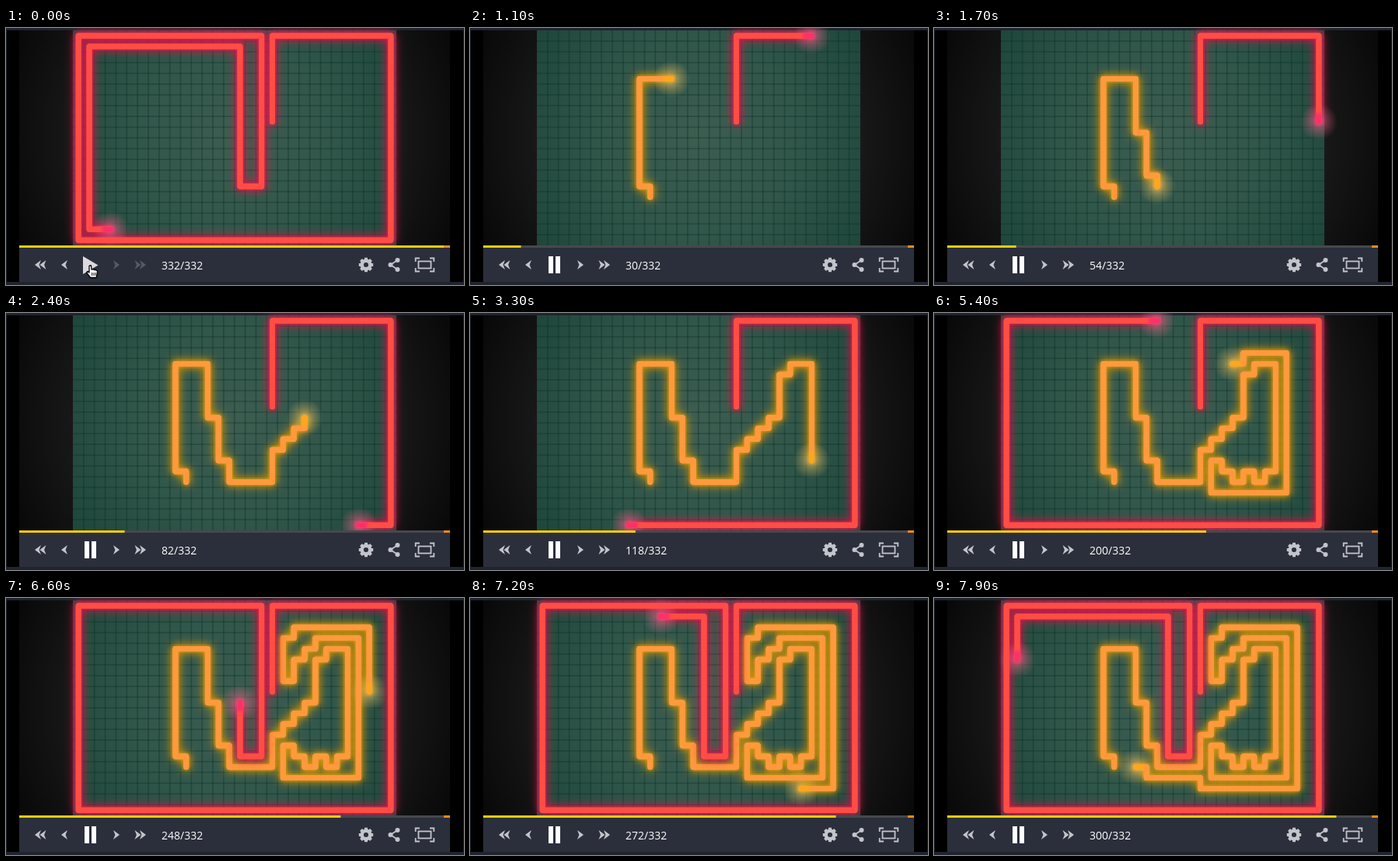
Animation of 589 by 331 pixels, one loop 8000 ms. Source, as an HTML page with a canvas:

```html
<!DOCTYPE html>
<html lang="en">
<head>
<meta charset="utf-8">
<title>Light trails replay</title>
<style>
  html, body { margin: 0; width: 100%; height: 100%; overflow: hidden; background: #000; }
  canvas { display: block; }
</style>
</head>
<body>
<canvas id="stage" width="589" height="331"></canvas>
<script>
const ctx = document.getElementById('stage').getContext('2d');
const LOOP = 8000, TOTAL = 332;
const CELL = 13.85, BOARD = { x: 86, y: 3, w: 416, h: 277 };
const ICON = '#c3c5cb', DIM = '#565a65';

const players = [
  {
    start: [10, 15], line: '#ff993d', glow: '#efa000', tip: '#ffa61c', halo: '255,205,110', lost: true,
    moves: 'U1 L1 U10 R3 D5 R1 D4 R1 D2 R4 U3 R1 U1 R1 U1 R1 U1 R1 U4 R1 U1 R2 D10 ' +
      'L1 D1 L1 U1 L1 D1 L1 U1 L1 U1 L1 D3 R7 U13 L4 D1 L1 D1 L1 D2 L1 U4 R1 U1 R7 D15 L9 U1 L5 U1 L1'
  },
  {
    start: [18, 8], line: '#ff4d45', glow: '#f5104c', tip: '#ff2f68', halo: '255,110,150', lost: false,
    moves: 'U8 R11 D19 L29 U19 R17 D14 L2 U13 L14 D17 R2'
  }
];
const DIRS = { U: [0, -1], D: [0, 1], L: [-1, 0], R: [1, 0] };

for (const p of players) {
  let [col, row] = p.start;
  p.cells = [[col, row]];
  for (const move of p.moves.split(' ')) {
    const [dx, dy] = DIRS[move[0]];
    for (let i = 0; i < +move.slice(1); i++) p.cells.push([col += dx, row += dy]);
  }
  p.points = p.cells.map(([c, r]) => [93.2 + c * CELL, 10 + r * CELL]);
}

function rect(color, x, y, w, h) {
  ctx.fillStyle = color;
  ctx.fillRect(x, y, w, h);
}

function radial(x, y, r, ...stops) {
  const g = ctx.createRadialGradient(x, y, 0, x, y, r);
  stops.forEach(([at, color]) => g.addColorStop(at, color));
  return g;
}

function trace(points) {
  ctx.beginPath();
  points.forEach(([x, y]) => ctx.lineTo(x, y));
}

function polygon(color, points) {
  trace(points);
  ctx.closePath();
  ctx.fillStyle = color;
  ctx.fill();
}

function stroke(color, width, points) {
  trace(points);
  ctx.strokeStyle = color;
  ctx.lineWidth = width;
  ctx.stroke();
}

function drawBackdrop() {
  rect('#20242e', 0, 0, 589, 331);
  rect('#000', 1, 3, 587, 324);
  rect(radial(294, 141, 310, [0, '#242424'], [0.65, '#191919'], [1, '#080808']), 17, 3, 554, 277);
  const { x, y, w, h } = BOARD;
  rect(radial(294, 141, 250, [0, '#3d5d51'], [0.5, '#31564a'], [1, '#1f463b']), x, y, w, h);
  for (let i = 1; i < 30; i++) rect('rgba(8,48,38,.38)', x + i * CELL - 0.8, y, 1.6, h);
  for (let i = 1; i < 20; i++) rect('rgba(8,48,38,.38)', x, y + i * CELL - 0.8, w, 1.6);
}

function drawTrail(p, steps) {
  const points = p.points.slice(0, steps + 1);
  const [hx, hy] = points[points.length - 1];
  ctx.lineCap = ctx.lineJoin = 'round';
  ctx.shadowColor = p.glow;
  for (const blur of [14, 7]) {
    ctx.shadowBlur = blur;
    stroke(p.line, 7, points);
  }
  ctx.shadowBlur = 0;
  const halo = radial(hx, hy, 24, [0, `rgba(${p.halo},.6)`], [0.4, `rgba(${p.halo},.32)`], [1, `rgba(${p.halo},0)`]);
  rect(halo, hx - 24, hy - 24, 48, 48);
  stroke(p.line, 7, points);
  const [px, py] = points[Math.max(0, points.length - 2)];
  const fade = ctx.createLinearGradient(px, py, hx, hy);
  fade.addColorStop(0, p.line);
  fade.addColorStop(0.4, p.tip);
  stroke(points.length > 1 ? fade : p.tip, 7, points.slice(-2));
}

function chevron(color, x, dir) {
  polygon(color, [[0, 0], [8, -6], [5.6, 0], [8, 6]].map(([dx, dy]) => [x + dx * dir, 305 + dy]));
}

function drawGear() {
  ctx.save();
  ctx.translate(463, 305);
  ctx.strokeStyle = ICON;
  ctx.lineWidth = 4.5;
  ctx.beginPath();
  ctx.arc(0, 0, 5.3, 0, 7);
  ctx.stroke();
  for (let i = 0; i < 8; i++) {
    rect(ICON, -2, -9.2, 4, 4);
    ctx.rotate(Math.PI / 4);
  }
  ctx.restore();
}

function drawShare() {
  stroke(ICON, 1.8, [[503.5, 299], [494.5, 305], [503.5, 311]]);
  for (const [x, y] of [[503.5, 299], [494.5, 305], [503.5, 311]]) {
    ctx.beginPath();
    ctx.arc(x, y, 3, 0, 7);
    ctx.fillStyle = ICON;
    ctx.fill();
  }
}

function drawFullscreen() {
  ctx.lineCap = 'butt';
  ctx.lineJoin = 'miter';
  for (const sx of [-1, 1]) for (const sy of [-1, 1]) {
    stroke(ICON, 1.8, [[6.5, 8.5], [11.8, 8.5], [11.8, 4]].map(([x, y]) => [538.5 + x * sx, 305 + y * sy]));
  }
  ctx.strokeRect(530.5, 300.5, 16, 9);
}

function drawHand() {
  ctx.lineJoin = 'round';
  const hand = [[107, 306], [109.5, 306], [110, 311], [112, 310.5], [113.5, 311.5], [115.5, 311.5],
    [117.5, 313], [117.5, 317], [116, 321.5], [108.5, 321.5], [104, 315.5], [104.5, 313.5], [107, 315]];
  polygon('#fff', hand);
  stroke('#000', 1.3, [...hand, hand[0]]);
  for (const x of [110.2, 112.7, 115.2]) rect('#000', x, 315, 1, 4);
}

function drawControls(n, playing) {
  rect('#2b2f3b', 17, 283, 554, 44);
  rect('#47484c', 17, 280, 554, 3);
  rect('#f3cb0c', 17, 280, 554 * (n - 1) / (TOTAL - 1), 3);
  rect('#ef8a1c', 563, 280, 8, 3);

  const forward = playing ? ICON : DIM;
  for (const x of [37, 43.5, 71]) chevron(ICON, x, 1);
  for (const x of [146, 173.5, 180]) chevron(forward, x, -1);
  if (playing) {
    rect('#fff', 101, 294, 6, 22);
    rect('#fff', 110, 294, 6, 22);
  } else {
    polygon('#dcd9de', [[99, 294], [118.5, 305.5], [99, 317]]);
  }
  ctx.font = '14px "Open Sans", sans-serif';
  ctx.fillStyle = '#fff';
  ctx.fillText(`${n}/${TOTAL}`, 200, 311);
  drawGear();
  drawShare();
  drawFullscreen();
  if (!playing) drawHand();
}

// The replay advances four turns per tick, with one short tick midway.
function turnAt(t) {
  if (t < 400) return TOTAL;
  return 2 + 4 * Math.floor((t - 400) / 100) - (t >= 4500 ? 2 : 0);
}

function draw(now) {
  const n = turnAt(now % LOOP), playing = n < TOTAL;
  drawBackdrop();
  for (const p of players) {
    if (playing || !p.lost) drawTrail(p, Math.floor(n / 2));
  }
  drawControls(n, playing);
}

const begin = performance.now();
function tick() {
  draw(performance.now() - begin);
  requestAnimationFrame(tick);
}
tick();
</script>
</body>
</html>
```
